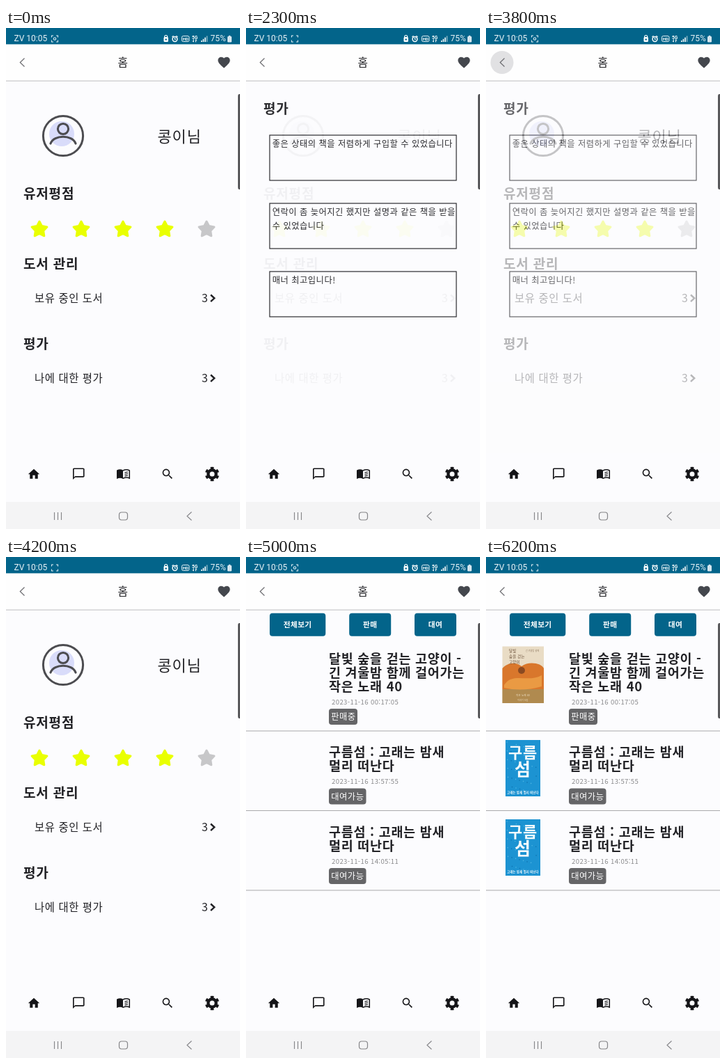
Animation, 336 px wide and 720 px high, one loop 6.6 s. Source, as an HTML page:

```html
<!DOCTYPE html>
<html lang="ko">
<head>
<meta charset="utf-8">
<style>
html, body { margin: 0; width: 100%; height: 100%; overflow: hidden; background: #fcfcfe; }
svg { display: block; width: 336px; height: 720px; font-family: "Noto Sans CJK KR", "Noto Sans CJK", sans-serif; }
text { white-space: pre; letter-spacing: .038em; }
.status text { font-family: Roboto, sans-serif; letter-spacing: 0; }
</style>
</head>
<body>
<svg id="stage" viewBox="0 0 336 720"></svg>
<script>
const LOOP = 6600, INK = '#222226', BLUE = '#03648a', PAPER = '#fcfcfe';

const text = (x, y, size, str, fill = INK, attrs = '') =>
  `<text x="${x}" y="${y}" font-size="${size}" fill="${fill}" ${attrs}>${str}</text>`;
const bold = (x, y, size, str, fill = INK, attrs = '') =>
  text(x, y, size, str, fill, 'font-weight="700" ' + attrs);
const rect = (x, y, w, h, fill, attrs = '') =>
  `<rect x="${x}" y="${y}" width="${w}" height="${h}" fill="${fill}" ${attrs}/>`;
const circle = (x, y, r, fill, attrs = '') =>
  `<circle cx="${x}" cy="${y}" r="${r}" fill="${fill}" ${attrs}/>`;
const line = (d, color, width, attrs = '') =>
  `<path d="${d}" fill="none" stroke="${color}" stroke-width="${width}" ${attrs}/>`;
const icon = (x, y, scale, d, fill = '#151518') =>
  `<path transform="translate(${x} ${y}) scale(${scale}) translate(-12 -12)" d="${d}" fill="${fill}"/>`;
const group = (id, body) => `<g id="${id}">${body}</g>`;
const page = (id, body) => group(id, rect(0, 76, 336, 535, PAPER) + body);

function star(x, fill) {
  const points = Array.from({ length: 10 }, (_, i) => {
    const r = i % 2 ? 6 : 11.5, a = (i / 5 - 0.5) * Math.PI;
    return (x + r * Math.cos(a)).toFixed(1) + ',' + (289.5 + r * Math.sin(a)).toFixed(1);
  });
  return `<polygon points="${points.join(' ')}" fill="${fill}" stroke="${fill}" stroke-width="3" stroke-linejoin="round"/>`;
}

const row = (y, label) => text(41, y, 15.4, label) + text(281, y, 15.8, '3') +
  line(`M294 ${y - 10.5}l5.2 4.8l-5.2 4.8`, INK, 2.4);
const heading = (y, label) => bold(25, y, 19.1, label);

const homePage = page('home',
  circle(80, 152, 18, '#d9dcfa') +
  circle(82, 155, 28.6, 'none', 'stroke="#4c4c50" stroke-width="3"') +
  circle(82, 145, 7.6, 'none', 'stroke="#4c4c50" stroke-width="3"') +
  line('M64 166C69 153 95 153 100 166', '#4c4c50', 3.2, 'stroke-linecap="round"') +
  text(217.5, 163.5, 22, '콩이님') +
  heading(245, '유저평점') +
  [0, 1, 2, 3, 4].map(i => star(48 + 60 * i, i < 4 ? '#e9ff00' : '#c7c7c9')).join('') +
  heading(346, '도서 관리') + row(394, '보유 중인 도서') +
  heading(461, '평가') + row(509, '나에 대한 평가'));

const reviews = [
  ['좋은 상태의 책을 저렴하게 구입할 수 있었습니다'],
  ['연락이 좀 늦어지긴 했지만 설명과 같은 책을 받을', '수 있었습니다'],
  ['매너 최고입니다!']
];
const reviewPage = page('review', heading(123, '평가') +
  reviews.map((lines, i) => {
    const y = 154 + 98 * i;
    return rect(34, y, 268, 65, 'none', `stroke="${INK}" stroke-width="1.2"`) +
      lines.map((s, k) => text(37.8, y + 17.4 + 19.6 * k, 12.3, s)).join('');
  }).join(''));

const button = (x, w, label) => rect(x, 80.8, w, 33, BLUE, 'rx="4"') +
  bold(x + w / 2, 101.2, 10.7, label, '#fff', 'text-anchor="middle"');

function item(bottom, lines, date, state, width) {
  return lines.map((s, i) => bold(119, bottom - 57.2 - 20 * (lines.length - 1 - i), 18.5, s)).join('') +
    text(123, bottom - 38.2, 9.6, date, '#8a8a8c') +
    rect(119, bottom - 32, width, 23, '#656567', 'rx="4"') +
    text(122.3, bottom - 16, 12.3, state, '#fff') +
    line(`M0 ${bottom}H336`, '#a9a9ab', 1.1);
}

const artCover = rect(23.5, 128.5, 59.5, 81.5, '#e9dcc5') +
  rect(23.5, 190, 59.5, 20, '#b08a4f') +
  '<path d="M23.5 190V160C30 152 43 150 51 157C62 149 80 153 83 160V190Z" fill="#d9772c"/>' +
  '<path d="M26 184C38 165 60 181 80 170V186Q52 194 26 188Z" fill="#ea9a43"/>' +
  circle(51, 163, 5, '#8a4a22') +
  ['달빛', '숲을 걷는', '고양이'].map((s, i) => text(33, 137 + 8 * i, 5.5, s, '#6a4f38')).join('') +
  text(57, 136, 3, '긴 겨울밤 함께', '#8a745c') +
  text(53, 200, 3.5, '작은 노래 40', '#f3e6cf', 'text-anchor="middle"') +
  text(53, 207, 3, '이야기 모음', '#f3e6cf', 'text-anchor="middle"');

const seaCover = y => rect(28, y, 50, 81, '#1c93d2') +
  Array.from({ length: 40 }, (_, i) =>
    circle(30 + i * 17.3 % 46, y + 3 + i * 29.7 % 75, 0.8, i % 2 ? '#0f73b0' : '#4db3e2')).join('') +
  bold(53, y + 26, 22, '구름', '#f4fafc', 'text-anchor="middle"') +
  bold(53, y + 51, 25, '섬', '#f4fafc', 'text-anchor="middle"') +
  bold(53, y + 77, 4.3, '고래는 밤새 멀리 떠난다', '#f4fafc', 'text-anchor="middle"');

const whale = ['구름섬 : 고래는 밤새', '멀리 떠난다'];
const listPage = page('list',
  button(34, 80.3, '전체보기') + button(148.2, 60, '판매') + button(242, 60, '대여') +
  group('items',
    item(250, ['달빛 숲을 걷는 고양이 -', '긴 겨울밤 함께 걸어가는', '작은 노래 40'], '2023-11-16 00:17:05', '판매중', 41) +
    item(364.5, whale, '2023-11-16 13:57:55', '대여가능', 53.5) +
    item(479, whale, '2023-11-16 14:05:11', '대여가능', 53.5)) +
  group('covers', artCover + seaCover(263) + seaCover(377)));

const statusBar = `<g class="status">` + rect(0, 0, 336, 23.4, BLUE) +
  text(11.5, 19.3, 12, 'ZV 10:05', '#e8f2f6') + text(293.5, 19.3, 12, '75%', '#e8f2f6') +
  line('M68 11H65.5V13.5M72 11H74.5V13.5M68 20H65.5V17.5M72 20H74.5V17.5', '#dcebf2', 1.1) +
  group('blink', circle(70, 15.5, 1.7, 'none', 'stroke="#dcebf2" stroke-width="1.1"')) +
  rect(226.5, 13, 6.5, 7, '#fff', 'rx="1.5"') + circle(229.7, 12.5, 2, 'none', 'stroke="#fff" stroke-width="1.2"') +
  circle(229.7, 16.5, 1.2, BLUE) +
  circle(242.5, 16, 3.4, 'none', 'stroke="#fff" stroke-width="1.5"') +
  line('M242.5 14V16.3H244M238.5 13L240.5 11.2M246.5 13L244.5 11.2', '#fff', 1.1) +
  rect(252.5, 11.5, 10.5, 8, 'none', 'rx="2" stroke="#fff" stroke-width=".9"') +
  bold(257.8, 17.8, 6, 'HD', '#fff', 'text-anchor="middle"') +
  bold(271, 15.5, 6.5, '5G', '#fff', 'text-anchor="middle"') +
  line('M269.3 16.5V20M267.8 18.5L269.3 20.2M272.5 20.3V16.8M274 18.3L272.5 16.6', '#fff', 1) +
  [0, 1, 2, 3].map(i => rect(280 + 2.6 * i, 18 - 2.2 * i, 1.6, 2 + 2.2 * i, '#fff', i > 2 ? 'opacity=".5"' : '')).join('') +
  rect(318, 12, 6, 8.5, '#d5e6ee', 'rx="1.2"') + rect(319.7, 10.8, 2.6, 1.5, '#d5e6ee') + '</g>';

const header = rect(0, 23, 336, 53, '#fefefe') + rect(0, 75.5, 336, 1.1, '#c4c4c6') +
  circle(23, 49.5, 16.5, '#e1e1e3', 'id="ripple"') +
  line('M26.5 43.5L20.3 49.5L26.5 55.5', '#6c6c70', 1.2) +
  text(168, 55.2, 15.8, '홈', INK, 'text-anchor="middle"') +
  icon(313, 49.5, 0.86, 'M12 21.35l-1.45-1.32C5.4 15.36 2 12.28 2 8.5 2 5.42 4.42 3 7.5 3c1.74 0 3.41.81 4.5 2.09C13.09 3.81 14.76 3 16.5 3 19.58 3 22 5.42 22 8.5c0 3.78-3.4 6.86-8.55 11.54z', '#44474d');

const tabs =
  icon(40, 641.2, 0.82, 'M10 20v-6h4v6h5v-8h3L12 3 2 12h3v8z') +
  icon(104.3, 640.7, 0.83, 'M20 2H4c-1.1 0-2 .9-2 2v18l4-4h14c1.1 0 2-.9 2-2V4c0-1.1-.9-2-2-2zm0 14H6l-2 2V4h16v12z') +
  '<path d="M159 635.5Q164 633 168 635.5V648Q164 645.5 159 648Z" fill="#151518"/>' +
  line('M168 636Q173 633.5 177.3 636V647Q173 645 168 647.3', '#151518', 1.5) +
  line('M170.5 638.8L175 638M170.5 641.3L175 640.5M170.5 643.8L175 643', '#151518', 1.2) +
  icon(232, 641, 0.82, 'M15.5 14h-.79l-.28-.27A6.47 6.47 0 0 0 16 9.5 6.5 6.5 0 1 0 9.5 16c1.61 0 3.09-.59 4.23-1.57l.27.28v.79l5 4.99L20.49 19zm-6 0C7 14 5 12 5 9.5S7 5 9.5 5 14 7 14 9.5 12 14 9.5 14z') +
  circle(296, 641, 5.7, 'none', 'stroke="#151518" stroke-width="4.4"') +
  circle(296, 641, 8.5, 'none', 'stroke="#151518" stroke-width="3.6" pathLength="60" stroke-dasharray="5 5" transform="rotate(15 296 641)"');

const systemBar = rect(0, 681, 336, 39, '#f4f4f5') +
  line('M69.5 696V707M74.5 696V707M79.5 696V707', '#858588', 1.1) +
  rect(162.5, 696, 12, 11, 'none', 'rx="3.5" stroke="#858588" stroke-width="1.2"') +
  line('M266.5 695.5L260 701.5L266.5 707.5', '#858588', 1.1);

const edge = '<path d="M336 95H335Q333 95 333 98V229Q333 232 335 232H336Z" fill="#58585b"/>';

stage.innerHTML = rect(0, 0, 336, 720, PAPER) + homePage + reviewPage + listPage +
  header + statusBar + tabs + systemBar + edge;

const parts = Object.fromEntries(['review', 'list', 'items', 'covers', 'blink', 'ripple']
  .map(id => [id, document.getElementById(id)]));
const ramp = (t, start, span) => Math.min(1, Math.max(0, (t - start) / span));
const fade = (t, start) => 1 - (1 - ramp(t, start, 350)) ** 2;
const show = (id, alpha) => parts[id].setAttribute('opacity', +alpha);

function draw(now) {
  const t = now % LOOP;
  show('review', fade(t, 2030) * (1 - fade(t, 3740)));
  show('list', fade(t, 4650));
  show('items', t >= 4900);
  show('covers', t >= 5100);
  show('blink', Math.floor((t + 400) / 500) % 2 === 0);
  show('ripple', ramp(t, 3560, 100) * (1 - ramp(t, 3850, 250)));
  requestAnimationFrame(draw);
}
draw(performance.now());
</script>
</body>
</html>
```
